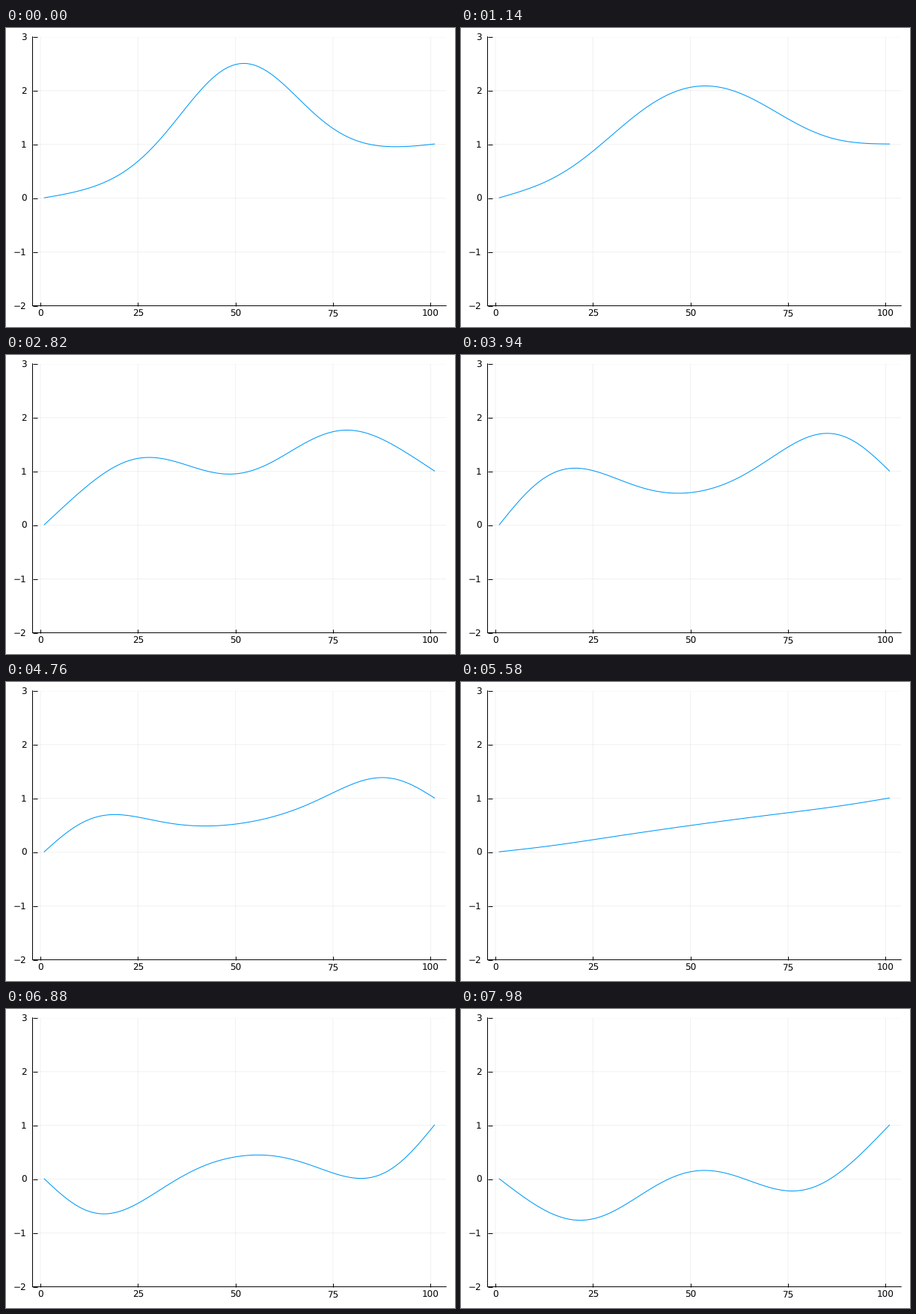
Write a matplotlib script that moves like this. It is 600 px wide and 400 px high and loops after 8000 ms.

```python
import numpy as np
import matplotlib.pyplot as plt
from matplotlib.animation import FuncAnimation

W, H, DPI = 600, 400, 100
TICK_MS, LOOP_MS = 20, 8000
POINTS = 101
COURANT2 = 0.18  # (wave speed * dt / dx) squared
LEFT, RIGHT, TOP, BOTTOM = 35.5, 588.2, 11.8, 371.6


def px(n):
    """Pixels to points."""
    return n * 72 / DPI


def step_at(i):
    """Three steps every seven ticks, the third one held."""
    if i < 6:
        return 0
    group, rest = divmod(i - 6, 7)
    return 1 + 3 * group + min(rest, 2)


def simulate(steps):
    """Wave on a string with fixed ends, starting at rest."""
    x = np.linspace(0, 1, POINTS)
    u = x + 2 * np.exp(-((x - 0.5) / 0.15) ** 2 / 2)
    prev, history = u, [u]
    for _ in range(steps):
        new = u.copy()
        bend = u[2:] - 2 * u[1:-1] + u[:-2]
        new[1:-1] = 2 * u[1:-1] - prev[1:-1] + COURANT2 * bend
        prev, u = u, new
        history.append(u)
    return history


count = LOOP_MS // TICK_MS
waves = simulate(step_at(count - 1))

plt.rcParams.update({"font.family": "DejaVu Sans", "path.snap": False,
                     "text.hinting": "none"})
fig = plt.figure(figsize=(W / DPI, H / DPI), dpi=DPI, facecolor="white")
ax = fig.add_axes([LEFT / W, 1 - BOTTOM / H,
                   (RIGHT - LEFT) / W, (BOTTOM - TOP) / H])
ax.set_xlim(-2, 104)
ax.set_ylim(-2, 3)
ax.set_xticks(range(0, 101, 25))
ax.set_yticks(range(-2, 4))
ax.set_axisbelow(True)
ax.grid(color="black", alpha=0.06, linewidth=px(1))
ax.tick_params(direction="in", width=px(1), labelsize=px(12))
ax.tick_params(axis="x", length=px(5), pad=px(5.5))
ax.tick_params(axis="y", length=px(6), pad=px(8))
for side in ("top", "right"):
    ax.spines[side].set_visible(False)
for side in ("left", "bottom"):
    ax.spines[side].set_linewidth(px(1))

line, = ax.plot(np.arange(1, POINTS + 1), waves[0],
                color="#009afa", linewidth=px(1.05))


def update(i):
    line.set_ydata(waves[step_at(i)])
    return line,


anim = FuncAnimation(fig, update, frames=count, interval=TICK_MS,
                     repeat=True, repeat_delay=0)
plt.show()
```
